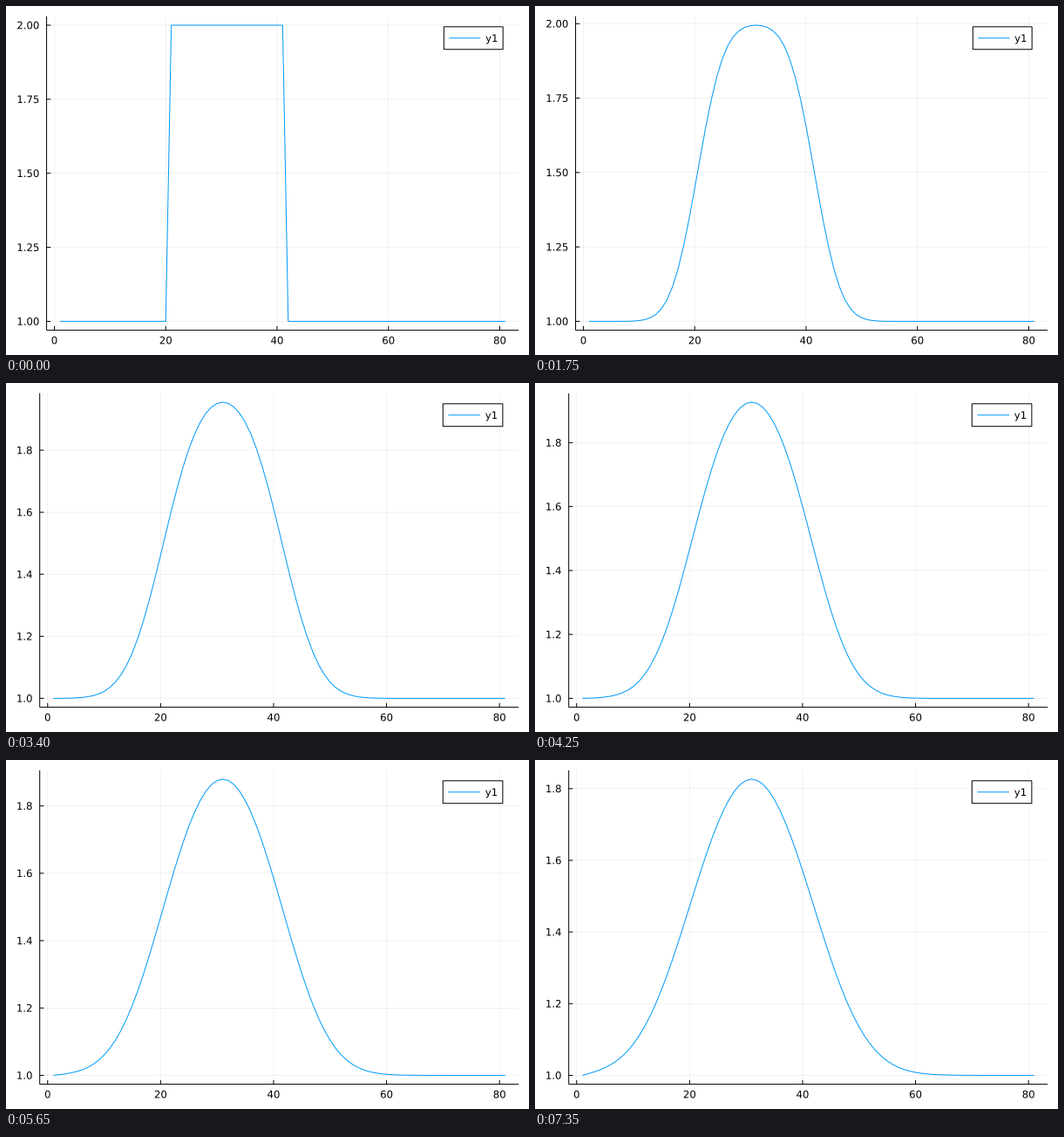
Write a matplotlib script that moves like this. It is 600x400 px and loops after 7400 ms.

```python
import numpy as np
import matplotlib.pyplot as plt
from matplotlib.animation import FuncAnimation
from matplotlib.patches import PathPatch
from matplotlib.path import Path
from matplotlib.textpath import TextPath

W, H, DPI = 600, 400, 100
PX = 72 / DPI                       # points per pixel
FRAMES, INTERVAL = 148, 50
TOP, BOTTOM, RIGHT = 11.81, 371.61, 588.19
TICK, EM = 4.72, 11.7
BLUE = "#009af9"
ADVANCE = {".": 0.318, "y": 0.592}  # em; digits are 0.636

NX, ALPHA = 81, 0.2028
xs = np.arange(1, NX + 1)


def diffuse(steps):
    """Explicit 1D diffusion of a square pulse with fixed ends."""
    u = np.ones(NX)
    u[20:41] = 2
    states = [u]
    for _ in range(steps - 1):
        v = u.copy()
        v[1:-1] += ALPHA * (u[2:] - 2 * u[1:-1] + u[:-2])
        states.append(v)
        u = v
    return states


states = diffuse(FRAMES)

fig = plt.figure(figsize=(W / DPI, H / DPI), dpi=DPI, facecolor="white")
ax = fig.add_axes([0, 0, 1, 1])


def line(x, y, color="black", width=1.0, alpha=1.0):
    ax.plot(x, y, color=color, lw=width * PX, alpha=alpha, snap=False,
            solid_capstyle="butt", solid_joinstyle="miter")


def label(x, mid, text, align=0.0):
    """Text with its digits centred on mid; align 0 left, 0.5 centre, 1 right."""
    width = EM * sum(ADVANCE.get(c, 0.636) for c in text)
    glyphs = TextPath((0, 0), text, size=EM, prop={"family": "DejaVu Sans"})
    shift = [x - align * width, mid + 0.3645 * EM]
    path = Path(glyphs.vertices * [1, -1] + shift, glyphs.codes)
    ax.add_patch(PathPatch(path, fc="black", lw=0, snap=False))


def legend(width):
    right = RIGHT - width / 30
    left = right - width / 10 - 13.66
    top, bottom = TOP + 12, TOP + 37.91
    mid, pad = (top + bottom) / 2, width / 90
    ax.fill([left, right, right, left], [top, top, bottom, bottom],
            fc="white", ec="black", lw=PX, snap=False, zorder=3)
    start, end = left + pad, left + pad + width / 15
    ax.plot([start, end], [mid, mid], color=BLUE, lw=PX, snap=False,
            solid_capstyle="butt", zorder=4)
    label(end + pad - 0.35, mid, "y1")
    ax.patches[-1].set_zorder(4)


def draw(i):
    ax.clear()
    ax.set(xlim=(0, W), ylim=(H, 0))
    ax.axis("off")

    u = states[i]
    span = u.max() - 1
    low, high = 1 - 0.03 * span, 1 + 1.03 * span
    if high >= 2:
        left, yticks, fmt = 46.57, np.arange(1, 2.01, 0.25), "{:.2f}"
    else:
        left, yticks, fmt = 38.7, np.arange(1, 1.81, 0.2), "{:.1f}"
    width = RIGHT - left

    def px(x):
        return left + (x + 1.4) / 84.8 * width

    def py(y):
        return BOTTOM - (y - low) / (high - low) * (BOTTOM - TOP)

    xticks = range(0, 81, 20)
    for t in xticks:
        line([px(t)] * 2, [TOP, BOTTOM], width=0.5, alpha=0.1)
    for t in yticks:
        line([left, RIGHT], [py(t)] * 2, width=0.5, alpha=0.1)

    line([left, RIGHT], [BOTTOM] * 2)
    line([left] * 2, [TOP, BOTTOM])
    for t in xticks:
        line([px(t)] * 2, [BOTTOM, BOTTOM - TICK])
        label(px(t), 383.1, str(t), 0.5)
    for t in yticks:
        line([left, left + TICK], [py(t)] * 2)
        label(left - 8.2, py(t), fmt.format(t), 1)

    line(px(xs), py(u), BLUE)
    legend(width)
    return []


anim = FuncAnimation(fig, draw, frames=FRAMES, interval=INTERVAL,
                     init_func=lambda: [], repeat=True, repeat_delay=0)
plt.show()
```
